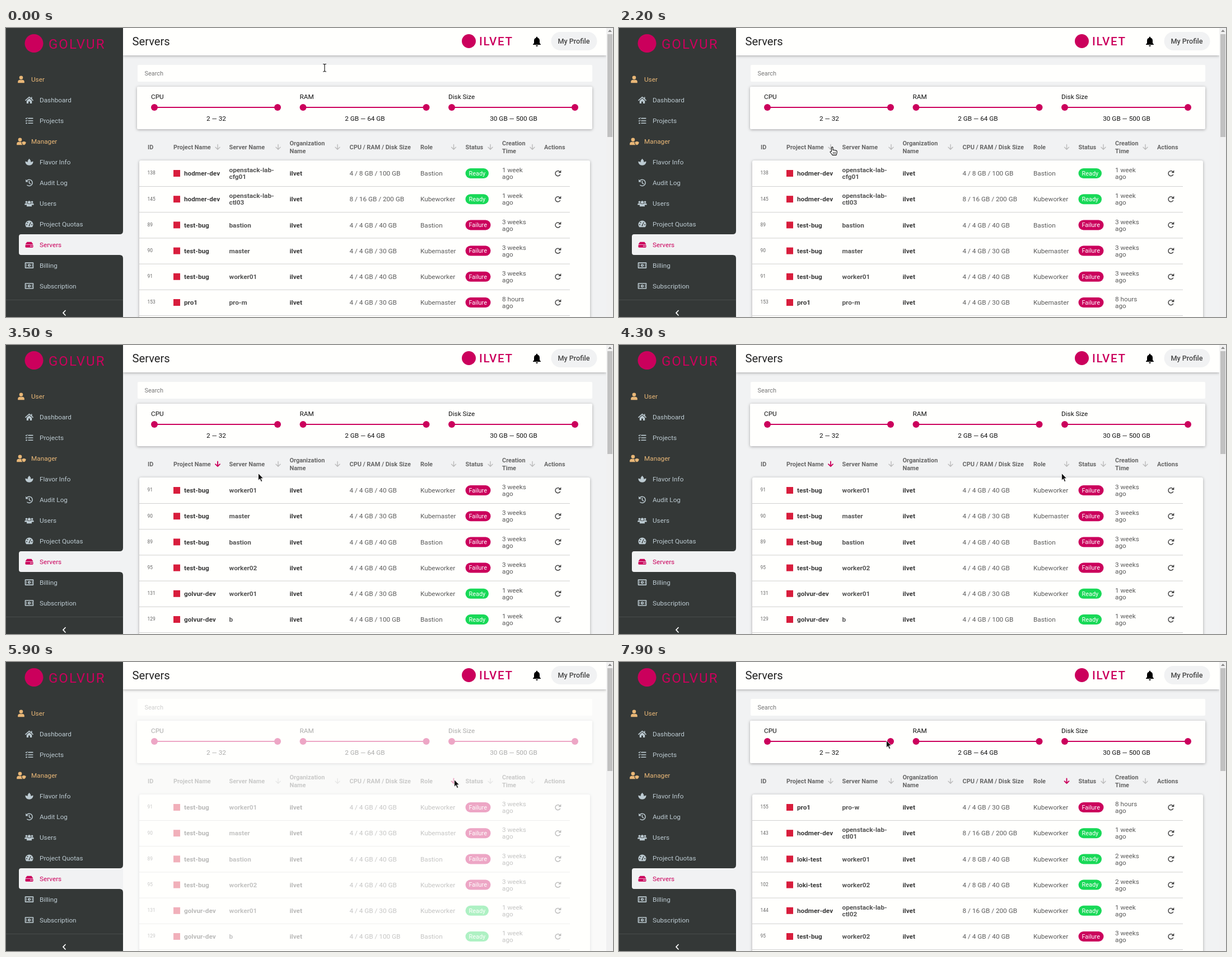
Write an HTML page that moves like this. It is 1084x517 px and loops after 8 s.

```html
<!DOCTYPE html>
<html lang="en">
<head>
<meta charset="utf-8">
<title>Servers</title>
<style>
  html, body { margin: 0; width: 100%; height: 100%; overflow: hidden; }
  svg { display: block; width: 100%; height: 100%; font-family: Roboto, sans-serif; }
  .card { fill: #fffffd; filter: drop-shadow(0 1px 2.5px rgba(0, 0, 0, .32)); }
  .line { fill: none; stroke-linecap: round; stroke-linejoin: round; }
</style>
</head>
<body>
<svg id="stage" viewBox="0 0 1084 517"></svg>
<script>
const PINK = '#cb005c', GREEN = '#18d957', PAPER = '#fffffd', PALE = '#f1f2f3';
const DARK = '#343837', MENU = '#bccad1', GOLD = '#e9b777';
const ZOOM = 0.84, ROW = 46.2, LOOP = 8000;

// Text centred vertically on y; size is in unzoomed pixels.
const text = (x, y, str, size, fill, weight = 400, extra = '') =>
  `<text x="${x}" y="${y + size * ZOOM * 0.355}" font-size="${size * ZOOM}" fill="${fill}" font-weight="${weight}" ${extra}>${str}</text>`;
const rect = (x, y, w, h, fill, r = 0, extra = '') =>
  `<rect x="${x}" y="${y}" width="${w}" height="${h}" rx="${r}" fill="${fill}" ${extra}/>`;
const circle = (x, y, r, fill) => `<circle cx="${x}" cy="${y}" r="${r}" fill="${fill}"/>`;
const fillPath = (d, fill) => `<path d="${d}" fill="${fill}" fill-rule="evenodd"/>`;
const linePath = (d, stroke, width) => `<path class="line" d="${d}" stroke="${stroke}" stroke-width="${width}"/>`;
const at = (x, y, body, extra = '') => `<g transform="translate(${x} ${y})" ${extra}>${body}</g>`;
const lines = (x, y, str, gap, ...style) => {
  const parts = str.split('/n');
  return parts.map((s, i) => text(x, y + (i - (parts.length - 1) / 2) * gap, s, ...style)).join('');
};

const person = c => circle(0, -3.2, 3.3, c) +
  fillPath('M-5.8 6.3V4.5Q-5.8 .8-2.3 .8H2.3Q5.8 .8 5.8 4.5V6.3Z', c);
const bill = c => linePath('M-7-4.5H7V4.5H-7Z', c, 1.6) + circle(0, 0, 2.6, c) +
  linePath('M-5-2V2M5-2V2M0-1V1', c, .8) + linePath('M0-1.2V1.2', DARK, .9);
const icons = {
  user: person,
  manager: c => at(-2, 0, person(c)) + fillPath('M5-1.5L9.5 0V2.5Q9 6 5 7.5Q1 6 .5 2.5V0Z', DARK) +
    fillPath('M5-.3L8.5 1V2.7Q8 5.3 5 6.6Q2 5.3 1.5 2.7V1Z', c),
  home: c => linePath('M-6.5 .4L0-5.3 6.5 .4', c, 1.6) + fillPath('M-4.7 1.2L0-2.9 4.7 1.2V6H1.4V2.5H-1.4V6H-4.7ZM3.2-5.4H5V-1.2L3.2-2.8Z', c),
  list: c => linePath('M-1.5-4.3H6.3M-1.5 0H6.3M-1.5 4.3H6.3', c, 1.6) +
    linePath('M-6.3-4.4L-5.3-3.4-3.6-5.4M-6.3-.1L-5.3 .9-3.6-1.1', c, 1.2) + circle(-5, 4.3, 1.2, c),
  leaf: c => fillPath('M0-6Q3.2-3 3 .2Q5-1 7.2-1Q6.6 5.5 0 6Q-6.6 5.5-7.2-1Q-5-1-3 .2Q-3.2-3 0-6Z', c),
  history: c => linePath('M-4.2-3.6A5.6 5.6 0 1 1-3.6 4.4M0-2.8V.5L2.3 2', c, 1.5) + fillPath('M-6.3-6V-1.2H-1.5Z', c),
  users: c => at(-5, -.8, person(c), 'transform-origin="0 0"').replace(')"', ') scale(.55)"') +
    at(5, -.8, person(c)).replace(')"', ') scale(.55)"') + at(0, .6, person(c)).replace(')"', ') scale(.78)"'),
  gauge: c => fillPath('M-5.2 5.5A7 7 0 1 1 5.2 5.5Z', c) + linePath('M0 2.5L2.6-3', DARK, 1.2) +
    [[-4.5, 1], [-3, -2.6], [4.6, 1], [0, 2.8]].map(([x, y]) => circle(x, y, 1, DARK)).join(''),
  server: c => fillPath('M-4-5H4L7-.6H-7Z', c) + rect(-7, 0, 14, 5, c, 1.3) + circle(2.5, 2.5, .9, PALE) + circle(5, 2.5, .9, PALE),
  bill
};

const menu = [
  ['Dashboard', 'home'], ['Projects', 'list'], null, ['Flavor Info', 'leaf'], ['Audit Log', 'history'], ['Users', 'users'],
  ['Project Quotas', 'gauge'], ['Servers', 'server'], ['Billing', 'bill'], ['Subscription', 'bill']
];

function sidebar() {
  const group = (y, label, icon) => at(27, y, icons[icon](GOLD)) + text(45, y, label, 14, GOLD);
  const items = menu.map((item, i) => {
    if (!item) return '';
    const y = 129 + 36.95 * i, color = item[0] === 'Servers' ? PINK : MENU;
    return at(41.5, y, icons[item[1]](color)) + text(60, y, item[0], 14, color);
  }).join('');
  return rect(0, 0, 209, 517, DARK) +
    fillPath('M209 363Q209 369 203 369H27Q23 369 23 373V402Q23 406 27 406H203Q209 406 209 412Z', PALE) +
    circle(50, 27.5, 16.5, PINK) +
    text(76, 28, 'GOLVUR', 28.6, PINK, 400, 'letter-spacing="2"') +
    group(92, 'User', 'user') + group(203, 'Manager', 'manager') + items +
    rect(0, 486, 209, 1, '#484d4c') + linePath('M106 505.5L102 509.7 106 514', '#fff', 1.7);
}

function topBar() {
  return rect(209, -6, 863, 55, PAPER, 0, 'class="card"') +
    text(225.5, 23.5, 'Servers', 24, '#222') +
    circle(826.5, 23.5, 12.5, PINK) +
    text(845, 23.5, 'ILVET', 24.5, PINK, 500, 'letter-spacing="1.6"') +
    fillPath('M948 15.5Q949.3 15.5 949.3 17.4Q953 18.3 953 22.5V27L955 29.3V30H941V29.3L943 27V22.5Q943 18.3 946.7 17.4Q946.7 15.5 948 15.5ZM946 31H950Q949.6 33 948 33Q946.4 33 946 31Z', '#000') +
    rect(973.5, 7, 82, 33, PALE, 16.5) + text(985.5, 23.5, 'My Profile', 15, '#444', 500);
}

function filters() {
  const slider = (x, label, range) => text(x - 6, 123, label, 14, '#111') +
    rect(x, 141, 220, 2, PINK) + circle(x, 142, 6, PINK) + circle(x + 220, 142, 6, PINK) +
    text(x + 110.5, 161.5, range, 14, '#111', 400, 'text-anchor="middle"');
  return rect(235, 66, 812, 30, PAPER, 2) + text(247.5, 81, 'Search', 13, '#777') +
    rect(234, 105, 813, 76, PAPER, 2, 'class="card"') +
    slider(265, 'CPU', '2 — 32') + slider(530.5, 'RAM', '2 GB — 64 GB') + slider(796, 'Disk Size', '30 GB — 500 GB');
}

const columns = [
  [253, 'ID'], [299, 'Project Name', 378], [398.5, 'Server Name', 486], [506.5, 'Organization/nName', 592],
  [613.5, 'CPU / RAM / Disk Size'], [740, 'Role', 799.5], [820.5, 'Status', 865], [886, 'Creation/nTime', 940], [961, 'Actions']
];
const sortArrow = ([x, label, arrowX]) => arrowX
  ? `<path class="line" id="${label.split(' ')[0]}" d="M${arrowX} 208.5V217M${arrowX - 4} 213.2L${arrowX} 217.2 ${arrowX + 4} 213.2" stroke="#bbb" stroke-width="1.4"/>` : '';
const tableHead = () => columns.map(c => lines(c[0], 213, c[1], 14, 13, '#666', 700) + sortArrow(c)).join('');

const worker91 = '91|test-bug|worker01|4/4/40|Kubeworker|Failure|3 weeks';
const master90 = '90|test-bug|master|4/4/30|Kubemaster|Failure|3 weeks';
const bastion89 = '89|test-bug|bastion|4/4/40|Bastion|Failure|3 weeks';
const worker95 = '95|test-bug|worker02|4/4/40|Kubeworker|Failure|3 weeks';
const control = (id, name) => `${id}|hodmer-dev|openstack-lab-/n${name}|8/16/200|Kubeworker|Ready|1 week`;
const tables = [
  ['138|hodmer-dev|openstack-lab-/ncfg01|4/8/100|Bastion|Ready|1 week', control(145, 'ctl03'),
    bastion89, master90, worker91, '153|pro1|pro-m|4/4/30|Kubemaster|Failure|8 hours'],
  [worker91, master90, bastion89, worker95,
    '131|golvur-dev|worker01|4/4/30|Kubeworker|Ready|1 week', '129|golvur-dev|b|4/4/100|Bastion|Ready|1 week'],
  ['155|pro1|pro-w|4/4/30|Kubeworker|Failure|8 hours', control(143, 'ctl01'),
    '101|loki-test|worker01|4/8/40|Kubeworker|Ready|2 weeks', '102|loki-test|worker02|4/8/40|Kubeworker|Ready|2 weeks',
    control(144, 'ctl02'), worker95]
];

function tableRow(row, i) {
  const [id, project, server, specs, role, status, age] = row.split('|');
  const [cpu, ram, disk] = specs.split('/');
  const y = 260 + ROW * i, ready = status === 'Ready';
  return text(252.5, y - .5, id, 10, '#666') +
    rect(299, y - 6, 12, 12, '#d81d3c') +
    text(318, y, project, 14, '#3a3a3a', 700) +
    lines(398.5, y, server, 12, 14, '#555', 700) +
    text(506.5, y, 'ilvet', 14, '#3a3a3a', 700) +
    text(613.5, y, `${cpu} / ${ram} GB / ${disk} GB`, 14, '#5a5a5a') +
    text(740, y, role, 14, '#5a5a5a') +
    rect(820.5, y - 9, ready ? 41.5 : 45, 18, ready ? GREEN : PINK, 9) +
    text(826.5, y, status, 13, '#fff') +
    lines(886, y, age + '/nago', 12, 14, '#5a5a5a') +
    at(985.5, y, linePath('M3.3-3A4.5 4.5 0 1 0 4 2.3', '#444', 1.5) + fillPath('M5.8-5.8V-.8H.8Z', '#444')) +
    rect(238, y + 23, 769, 1, '#d0d0d0');
}

const cursors = {
  beam: linePath('M-2.5-6.5Q0-6.5 0-5V5.5Q0 7-2.5 7M2.5-6.5Q0-6.5 0-5M0 5.5Q0 7 2.5 7', '#222', 1.2),
  arrow: '<path d="M.5 .5V13.2L3.4 10.5 5.5 15.6 7.7 14.6 5.6 9.7H9.5Z" fill="#111" stroke="#fff" stroke-width=".8"/>',
  hand: '<path class="line" d="M-.5 8V1Q.8-1.2 2 1V5.5Q3.5 4.6 4.3 5.8Q5.8 5 6.7 6.3Q8.6 5.7 9.2 7.5V10Q8.8 12 8 14.4H1.2Q-.8 11.5-3 9Q-2.6 6.8-.5 8Z" style="fill:#fff" stroke="#111" stroke-width="1.1"/>' +
    linePath('M2.5 9V12M4.5 9V12M6.5 9V12', '#111', .8)
};

const stage = document.getElementById('stage');
stage.innerHTML = rect(0, 0, 1084, 517, PALE) + filters() + tableHead() +
  rect(238, 237, 805, 300, PAPER, 3, 'class="card"') +
  tables.map((rows, i) => `<g id="table${i}">${rows.map(tableRow).join('')}</g>`).join('') +
  rect(209, 49, 863, 468, '#fffffd', 0, 'id="veil"') + topBar() + sidebar() +
  rect(1072, 0, 12, 517, '#f1f1f1') + rect(1074, 11, 9, 184, '#c1c1c1') + fillPath('M1075 7L1078.5 3 1082 7Z', '#888') +
  Object.keys(cursors).map(name => `<g id="${name}">${cursors[name]}</g>`).join('');

const $ = id => document.getElementById(id);

// Each key is a time followed by the values reached at that time.
const cursorPath = [
  [0, 569, 71], [500, 569, 71], [800, 540, 107], [900, 540, 107], [1200, 407, 196], [1700, 367, 219],
  [1800, 367, 219], [2200, 380, 213], [2700, 380, 213], [2900, 471, 145], [3100, 471, 145], [3200, 376, 214],
  [3300, 388, 218], [3400, 388, 218], [3500, 450, 229], [3800, 585, 240], [4300, 790, 229], [4800, 804, 217],
  [5200, 800, 210], [5900, 800, 210], [6600, 795, 215], [7500, 445, 159], [7900, 477, 140], [8000, 477, 140]
];
const veilKeys = [
  [0, 0], [2400, 0], [2600, .65], [2700, .65], [2900, 0], [5700, 0], [5900, .65], [6300, .65], [6500, 0], [8000, 0]
];

function sample(keys, t) {
  const i = Math.max(1, keys.findIndex(k => k[0] >= t));
  const a = keys[i - 1], b = keys[i], u = (t - a[0]) / (b[0] - a[0]);
  return a.slice(1).map((v, n) => v + (b[n + 1] - v) * u);
}
const within = (t, from, to) => t >= from && t < to;

function setArrow(id, active, shown = true) {
  const arrow = $(id);
  arrow.setAttribute('stroke', active ? PINK : '#bbb');
  arrow.setAttribute('stroke-width', active ? 1.9 : 1.4);
  arrow.setAttribute('visibility', shown ? 'visible' : 'hidden');
}

function draw(now) {
  const t = Math.floor(now % LOOP / 100) * 100;
  const [x, y] = sample(cursorPath, t);
  const overLink = within(t, 1900, 2500) || within(t, 3200, 3300) || within(t, 4700, 5800);
  const shape = t < 700 ? 'beam' : overLink ? 'hand' : 'arrow';
  for (const name in cursors) {
    $(name).setAttribute('visibility', name === shape ? 'visible' : 'hidden');
    $(name).setAttribute('transform', `translate(${x} ${y})`);
  }
  const table = t < 2800 ? 0 : t < 6400 ? 1 : 2;
  tables.forEach((_, i) => $('table' + i).setAttribute('visibility', i === table ? 'visible' : 'hidden'));
  $('veil').setAttribute('opacity', sample(veilKeys, t)[0]);
  setArrow('Project', within(t, 2500, 5800), !within(t, 5800, 6200));
  setArrow('Role', t >= 5800);
}

const start = performance.now();
function tick() {
  draw(performance.now() - start);
  requestAnimationFrame(tick);
}
tick();
</script>
</body>
</html>
```
